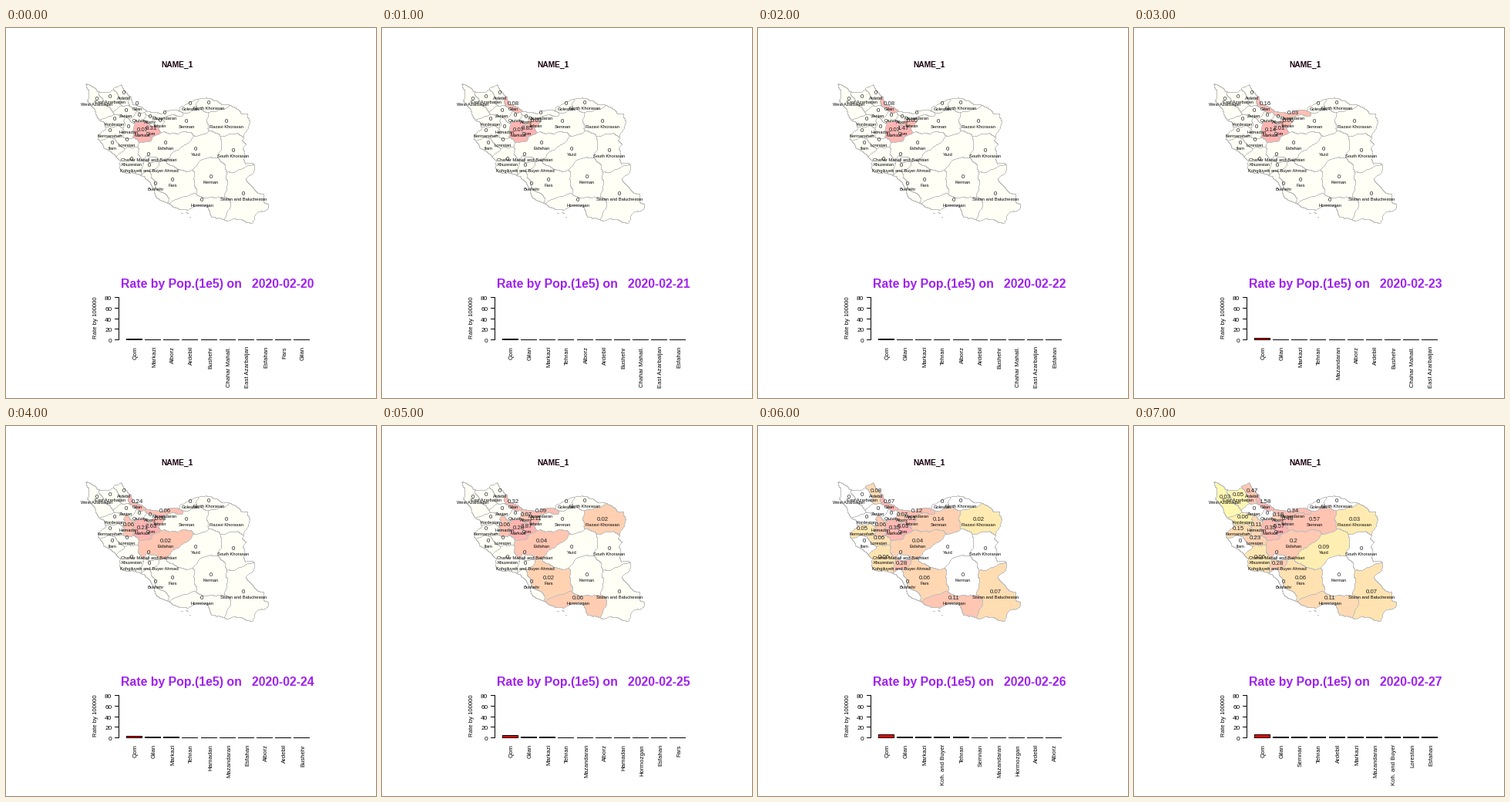
A matplotlib script for the animation above (8000 ms loop, 480 by 480 pixels).

```python
import math
import random

import matplotlib.pyplot as plt
import numpy as np
from matplotlib.animation import FuncAnimation
from matplotlib.patches import Rectangle
from matplotlib.path import Path

SIZE, DPI, DAYS = 480, 80, 8
PT = 72 / DPI  # points per pixel
GREY = (0.745, 0.745, 0.745)
IVORY, WHITE = (1, 1, 0.965), (1, 1, 1)

plt.rcParams["font.family"] = "Liberation Sans"
rng = random.Random(4)

fig = plt.figure(figsize=(SIZE / DPI, SIZE / DPI), dpi=DPI, facecolor="white")
ax = fig.add_axes([0, 0, 1, 1])
ax.axis("off")


def text(x, y, s, px, **kw):
    opts = dict(ha="center", va="baseline", color="black", zorder=4)
    return ax.text(x, y, s, fontsize=px * PT, **{**opts, **kw})


def block(x, y, w, h, color="black"):
    return ax.add_patch(Rectangle((x, y), w, h, fc=color, lw=0, antialiased=False))


# --- provinces: a spine (dx, dy either side of the centre) with reach r;
# --- rates run up to the last day, zero before
provinces = []


def province(name, x, y, dx=0, dy=0, r=6, rates=(), bar=None):
    provinces.append(dict(name=name, x=x, y=y, dx=dx, dy=dy, r=r, bar=bar or name,
                          start=DAYS - len(rates),
                          rates=[0] * (DAYS - len(rates)) + list(rates)))


province("West Azarbaijan", 118, 99, 9, 16, 8, rates=[0.03])
province("East Azarbaijan", 135, 96, 8, 4, 8, rates=[0.05])
province("Ardebil", 153, 91, 3, 9, rates=[0.08, 0.47])
province("Gilan", 170, 105, 9, 6, 4, rates=[0.08, 0.08, 0.16, 0.24, 0.32, 0.67, 1.58])
province("Zanjan", 156, 114, 7, 2)
province("Kordestan", 141, 125, 10, 2, rates=[0.06])
province("Hamadan", 159, 135, 0, 7, rates=[0.06, 0.06, 0.06, 0.11])
province("Kermanshah", 135, 140, 11, 0, rates=[0.05, 0.15])
province("Qazvin", 173, 120, 5, 0)
province("Alborz", 187, 122, 4, -1, 4, rates=[0.07, 0.07, 0.18])
province("Tehran", 200, 127, 9, 0, 4, rates=[0.03, 0.05, 0.06, 0.08, 0.11, 0.2, 0.48])
province("Mazandaran", 206, 117, 20, 0, 4, rates=[0.03, 0.06, 0.09, 0.12, 0.34])
province("Golestan", 239, 105, 8, -2)
province("North Khorasan", 263, 104, 12, 0)
province("Razavi Khorasan", 286, 128, 14, 0, 14, rates=[0.02, 0.02, 0.03])
province("Semnan", 234, 128, 20, -1, 13, rates=[0.14, 0.57])
province("Markazi", 177, 139, 3, 5, 9,
         rates=[0.07, 0.07, 0.07, 0.14, 0.21, 0.28, 0.35, 0.35])
province("Qom", 188, 137, 5, -1,
         rates=[0.31, 0.85, 1.47, 2.01, 2.63, 3.87, 5.03, 5.57])
province("Esfahan", 207, 156, 20, -6, 13, rates=[0.02, 0.04, 0.04, 0.2])
province("Yazd", 246, 164, 20, -11, 14, rates=[0.09])
province("South Khorasan", 295, 166, 2, 10, 14)
province("Lorestan", 157, 152, 6, 2, rates=[0.06, 0.23])
province("Ilam", 138, 156, 7, 4, 5)
province("Chahar Mahall and Bakhtiari", 185, 171, 4, 5, 5, bar="Chahar Mahall.")
province("Khuzestan", 163, 177, 3, 5, 12, rates=[0.06, 0.06])
province("Kohgiluyeh and Buyer Ahmad", 186, 185, 6, 1, rates=[0.28, 0.28],
         bar="Koh. and Buyer")
province("Bushehr", 194, 209, 9, 14, 4)
province("Fars", 216, 204, 9, 4, 19, rates=[0.02, 0.06, 0.06])
province("Kerman", 266, 200, 0, 6, 18)
province("Sistan and Baluchestan", 308, 222, 3, 18, 16, rates=[0.07, 0.07])
province("Hormozgan", 254, 230, 30, 4, 5, rates=[0.06, 0.11, 0.11])

# key points of the outer border, clockwise from the north-west
COAST = [(104, 73), (120, 83), (133, 84), (150, 74), (156, 84), (163, 90), (165, 100),
         (177, 103), (184, 109), (202, 112), (226, 108), (226, 103), (243, 95),
         (266, 92), (283, 100), (292, 101), (306, 112), (314, 112), (315, 128),
         (307, 146), (312, 152), (308, 157), (311, 177), (322, 177), (323, 184),
         (312, 196), (324, 212), (335, 216), (335, 227), (341, 229), (340, 236),
         (324, 242), (320, 254), (291, 250), (267, 246), (262, 230), (254, 230),
         (237, 237), (211, 228), (195, 220), (185, 199), (179, 193), (164, 188),
         (152, 188), (148, 181), (149, 172), (128, 157), (120, 145), (121, 138),
         (130, 131), (128, 123), (121, 120), (106, 96), (108, 90)]


def rough(a, b):
    """Split a segment at displaced midpoints; returns the points before b."""
    dx, dy = b[0] - a[0], b[1] - a[1]
    if math.hypot(dx, dy) < 3:
        return [a]
    k = rng.uniform(-0.12, 0.12)
    mid = ((a[0] + b[0]) / 2 - dy * k, (a[1] + b[1]) / 2 + dx * k)
    return rough(a, mid) + rough(mid, b)


def build_map():
    """Number every pixel: 0 outside, 1 border line, 2 and up a province."""
    ys, xs = np.mgrid[:SIZE, :SIZE] + 0.5
    ring = sum((rough(a, b) for a, b in zip(COAST, COAST[1:] + COAST[:1])), [])
    inside = Path(ring).contains_points(np.c_[xs.ravel(), ys.ravel()])
    inside = inside.reshape(SIZE, SIZE)

    # wavy coordinates make the inner borders irregular
    u = xs + 1.3 * np.sin(ys / 4 + xs / 17) + 0.6 * np.sin(ys / 1.7)
    v = ys + 1.3 * np.sin(xs / 5 + ys / 13) + 0.6 * np.sin(xs / 1.9)
    gaps = []
    for p in provinces:
        dx, dy = p["dx"], p["dy"]
        ru, rv = u - p["x"], v - (p["y"] - 4)
        t = np.clip((ru * dx + rv * dy) / max(dx * dx + dy * dy, 1), -1, 1)
        gaps.append(np.hypot(ru - t * dx, rv - t * dy) - p["r"])
    cells = np.where(inside, np.argmin(gaps, axis=0) + 2, 0)

    edge = np.zeros_like(inside)
    edge[:, :-1] |= cells[:, :-1] != cells[:, 1:]
    edge[:-1] |= cells[:-1] != cells[1:]
    cells[edge] = 1
    for _ in range(6):  # small islands
        x, y = rng.randint(226, 241), rng.randint(239, 245)
        cells[y, x:x + 2] = 1
    return cells


def palette(day):
    """Pale heat colours, ranked by rate and days since the first case."""
    weight = [p["rates"][day] * (day + 1 - p["start"]) for p in provinces]
    order = sorted(range(len(provinces)), key=lambda i: -weight[i])
    colors = [WHITE, GREY] + [IVORY if day < 6 else WHITE] * len(provinces)
    for rank, i in enumerate(order):
        if weight[i] > 0:
            colors[i + 2] = (1, 0.7 + 0.3 * rank / 23, 0.7)
    return np.array(colors)


cells = build_map()
picture = ax.imshow(palette(0)[cells], extent=(0, SIZE, SIZE, 0),
                    interpolation="nearest", aspect="auto", zorder=0)

values = []
for p in provinces:
    values.append(text(p["x"], p["y"] - 5.3, "", 7.9, color="#222222"))
    text(p["x"], p["y"] + 2, p["name"], 5.8)

text(222, 51, "NAME_1", 10.3, weight="bold", color="#1a0010")
title = text(149, 337, "", 15.9, weight="bold", color="#a020f0", ha="left")

# --- bar chart
text(118, 375.5, "Rate by 100000", 7.7, rotation=90, va="center_baseline",
     rotation_mode="anchor").set_x(115)
block(146, 349, 1, 56)
for v in range(0, 81, 20):
    y = round(404 - 0.685 * v)
    block(141, y, 6, 1)
    text(137.5, y + 3.8, str(v), 8.2, ha="right")

bars = []
for i in range(10):
    x = round(156.15 + 24.1 * i)
    label = text(x + 14, 413, "", 7.8, rotation=90, ha="right", rotation_mode="anchor")
    bars.append((block(x, 404, 21, 1), block(x + 1, 404, 19, 0, "red"), label))


def draw(day):
    picture.set_data(palette(day)[cells])
    for value, p in zip(values, provinces):
        value.set_text(f"{p['rates'][day]:g}")
    title.set_text(f"Rate by Pop.(1e5) on   2020-02-{20 + day}")

    top = sorted(provinces, key=lambda p: (-p["rates"][day], p["bar"]))
    for (frame, inner, label), p in zip(bars, top):
        y = min(404, round(403.62 - 0.685 * p["rates"][day]))
        frame.set_y(y)
        frame.set_height(405 - y)
        inner.set_y(y + 1)
        inner.set_height(max(0, 403 - y))
        label.set_text(p["bar"])
    return []


ax.set_xlim(0, SIZE)
ax.set_ylim(SIZE, 0)
anim = FuncAnimation(fig, draw, frames=DAYS, interval=1000, repeat=True,
                     repeat_delay=0, blit=False)
plt.show()
```
